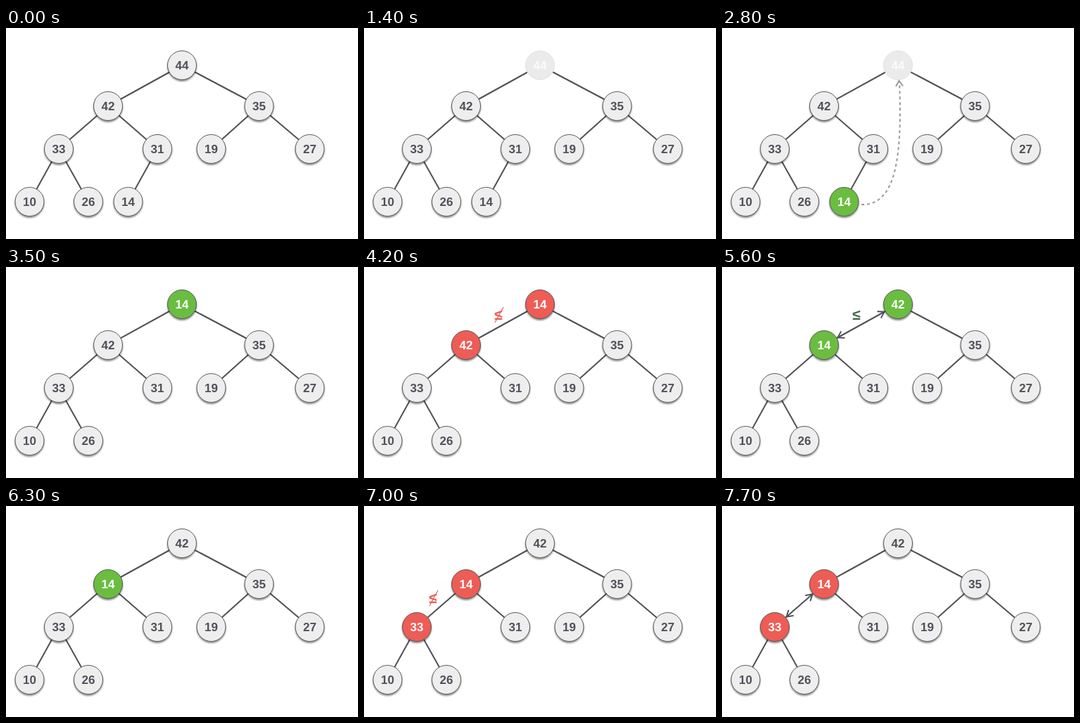
Animation of 500x300 px, one loop 8000 ms. Source, as an HTML page:

```html
<!DOCTYPE html>
<html lang="en">
<head>
<meta charset="utf-8">
<title>Heap deletion</title>
<style>
  html, body { margin: 0; width: 100%; height: 100%; overflow: hidden; background: #fff; }
  svg { display: block; width: 500px; height: 300px; }
  text { font: bold 17px "Liberation Sans", Arial, sans-serif; text-anchor: middle; }
  .edge { stroke: #505058; stroke-width: 2; fill: none; }
  .head { stroke: #505058; stroke-width: 2; fill: none; stroke-linecap: round; }
  .node { filter: drop-shadow(0 2px 1.2px rgba(0, 0, 0, .45)); }
  .node circle { stroke: #5a5a5a; stroke-width: 1; }
  .plain circle { fill: #eee; }
  .plain text { fill: #50505a; }
  .green circle { fill: #6abd40; }
  .red circle { fill: #ee5c56; }
  .green text, .red text { fill: #fff; }
  .node.ghost { filter: none; }
  .ghost circle { fill: #ebebeb; stroke: #e2e2e2; }
  .ghost text { fill: #fbfbfb; }
  .hop { fill: none; stroke: #98989c; stroke-width: 2; }
  .dash { stroke-dasharray: 4 4; }
  .sign { font-size: 21px; }
  .yes { fill: #3f6548; }
  .no { fill: #ee5c56; }
  .slash { stroke: #ee5c56; stroke-width: 1.2; }
  .timed { animation: 8s step-end infinite; }
</style>
</head>
<body>
<svg id="stage" viewBox="0 0 500 300"></svg>
<script>
const LOOP = 8000;
const stage = document.getElementById('stage');
const sheet = document.head.appendChild(document.createElement('style'));
const windows = new Set();
const spots = {
  root: [250, 53], left: [145, 111], right: [359.5, 111],
  ll: [75, 172], lr: [215, 172], rl: [291.5, 172], rr: [431.5, 172],
  a: [33.5, 247], b: [117, 247], c: [173.5, 247]
};
let markup = '';

// Wraps markup in a group that is visible from start to end only.
function show(inner, start = 0, end = LOOP) {
  if (start === 0 && end === LOOP) { markup += inner; return; }
  const name = `show-${start}-${end}`;
  if (!windows.has(name)) {
    windows.add(name);
    const pct = t => t / LOOP * 100 + '%';
    const first = start ? `0% { visibility: hidden } ${pct(start)} { visibility: visible }`
                        : '0% { visibility: visible }';
    const last = end < LOOP ? `${pct(end)}, 100% { visibility: hidden }`
                            : '100% { visibility: visible }';
    sheet.textContent += `@keyframes ${name} { ${first} ${last} }\n`;
  }
  markup += `<g class="timed" style="animation-name:${name}">${inner}</g>`;
}

function edge(from, to, start, end) {
  const [x1, y1] = spots[from], [x2, y2] = spots[to];
  show(`<line class="edge" x1="${x1}" y1="${y1}" x2="${x2}" y2="${y2}"/>`, start, end);
}

function node(spot, value, look, start, end) {
  const [x, y] = spots[spot];
  show(`<g class="node ${look}"><circle cx="${x}" cy="${y}" r="20.5"/>` +
       `<text x="${x}" y="${y + 6}">${value}</text></g>`, start, end);
}

function head(x, y, angle) {
  return `<path class="head" d="M-8 -5L0 0L-8 5" transform="translate(${x} ${y}) rotate(${angle})"/>`;
}

// Arrowheads at both ends of an edge, just outside the circles.
function swap(from, to, start, end) {
  const [x1, y1] = spots[from], [x2, y2] = spots[to];
  const dx = x2 - x1, dy = y2 - y1, len = Math.hypot(dx, dy);
  const ux = dx / len * 22, uy = dy / len * 22;
  const angle = Math.atan2(dy, dx) * 180 / Math.PI;
  show(head(x1 + ux, y1 + uy, angle + 180) + head(x2 - ux, y2 - uy, angle), start, end);
}

function sign(x, y, ok, start, end) {
  const slash = ok ? '' :
    `<line class="slash" x1="${x - 5}" y1="${y + 11}" x2="${x + 7}" y2="${y - 11}"/>`;
  show(`<text class="sign ${ok ? 'yes' : 'no'}" x="${x}" y="${y + 7}">≤</text>${slash}`, start, end);
}

[['root', 'left'], ['root', 'right'], ['left', 'll'], ['left', 'lr'],
 ['right', 'rl'], ['right', 'rr'], ['ll', 'a'], ['ll', 'b']].forEach(([p, q]) => edge(p, q));
edge('lr', 'c', 0, 3500);

node('right', 35, 'plain');
node('lr', 31, 'plain');
node('rl', 19, 'plain');
node('rr', 27, 'plain');
node('a', 10, 'plain');
node('b', 26, 'plain');

node('root', 44, 'plain', 0, 1400);
node('root', 44, 'ghost', 1400, 3500);
node('root', 14, 'green', 3500, 4200);
node('root', 14, 'red', 4200, 5600);
node('root', 42, 'green', 5600, 6300);
node('root', 42, 'plain', 6300, LOOP);

node('left', 42, 'plain', 0, 4200);
node('left', 42, 'red', 4200, 5600);
node('left', 14, 'green', 5600, 7000);
node('left', 14, 'red', 7000, LOOP);

node('ll', 33, 'plain', 0, 7000);
node('ll', 33, 'red', 7000, LOOP);

node('c', 14, 'plain', 0, 2100);
node('c', 14, 'green', 2100, 3500);

show('<path class="hop dash" d="M198 251C248 253 256 180 252 77"/>' +
     '<path class="hop" d="M247 83L251.500 75L257 82.500"/>', 2800, 3500);

sign(191, 68, false, 4200, 4900);
swap('root', 'left', 4900, 6300);
sign(191, 68, true, 5600, 6300);
sign(98, 131, false, 7000, 7700);
swap('left', 'll', 7700, LOOP);

stage.innerHTML = markup;
</script>
</body>
</html>
```
